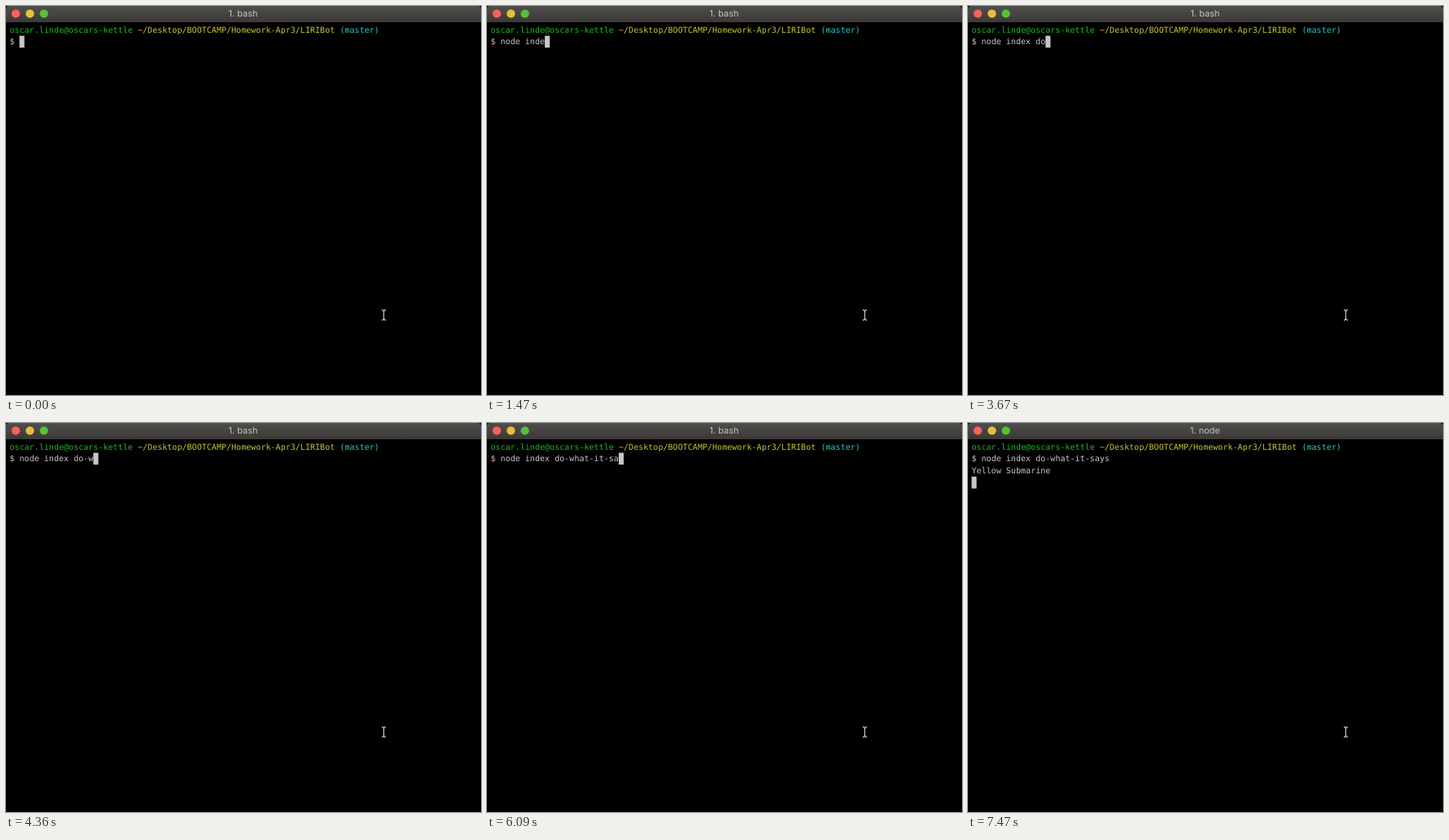
An HTML page that plays this animation: 584 by 479 pixels, repeating every 8000 ms.

```html
<!DOCTYPE html>
<html lang="en">
<head>
<meta charset="utf-8">
<title>Terminal</title>
<style>
  html, body { margin: 0; width: 100%; height: 100%; overflow: hidden; background: #000; }
  svg { display: block; width: 584px; height: 479px; }
  text { white-space: pre; text-rendering: geometricPrecision; }
  .term { font: 10.07px "DejaVu Sans Mono", monospace; fill: #c7c7c7; }
  .title { font: 11px Inter, sans-serif; fill: #c4c2c0; text-anchor: middle; }
</style>
</head>
<body>
<svg viewBox="0 0 584 479">
  <defs>
    <linearGradient id="bar" x2="0" y2="1">
      <stop offset="0" stop-color="#504e4c"/>
      <stop offset="1" stop-color="#3b3937"/>
    </linearGradient>
  </defs>
  <rect width="584" height="479"/>
  <path d="M0 20V4Q0 0 4 0H580Q584 0 584 4V20Z" fill="url(#bar)"/>
  <circle cx="12" cy="9.4" r="5.2" fill="#fb5f5a"/>
  <circle cx="29.4" cy="9.4" r="5.2" fill="#e5bf3c"/>
  <circle cx="46.6" cy="9.4" r="5.2" fill="#56c037"/>
  <text id="title" class="title" x="291.5" y="13.3"></text>
  <g id="lines" class="term"></g>
  <rect id="caret" width="6.1" height="14.6" fill="#c7c7c7"/>
  <path d="M462 374Q464.5 374.3 464.5 377V384Q464.5 386.7 462 387M467 374Q464.5 374.3 464.5 377M464.5 384Q464.5 386.7 467 387" fill="none" stroke="#cfcfcf" stroke-width="1.1"/>
</svg>
<script>
const LOOP = 8000, CELL = 6.06, LINE = 14.67, LEFT = 4.4;

// One slot per beat, split by "|": characters to type, "<" to delete, or a pause.
const BEATS = "n|o|d|e| ||in||d|e||x|||<|x| |||||d|||o|||-||w|h|at||-||i|t||-|s||a|ys".split("|");
const BEAT = 145, TYPE = 140, ENTER = 6790, OUTPUT = 7070, RETITLE = 7470;

const byId = id => document.getElementById(id);
const title = byId("title"), caret = byId("caret"), lines = byId("lines");

function addText(col, row, text, color) {
  const el = document.createElementNS("http://www.w3.org/2000/svg", "text");
  el.setAttribute("x", LEFT + col * CELL);
  el.setAttribute("y", 32.7 + row * LINE);
  if (color) el.setAttribute("fill", color);
  el.textContent = text;
  lines.append(el);
  return el;
}

addText(0, 0, "oscar.linde@oscars-kettle", "#1db825");
addText(26, 0, "~/Desktop/BOOTCAMP/Homework-Apr3/LIRIBot", "#c7c436");
addText(67, 0, "(master)", "#30c3c9");
addText(0, 1, "$");
const typed = addText(2, 1, "");
const output = addText(0, 2, "");

function commandAt(t) {
  const played = Math.max(0, Math.floor((t - TYPE) / BEAT) + 1);
  return BEATS.slice(0, played).reduce(
    (text, keys) => keys === "<" ? text.slice(0, -1) : text + keys, "");
}

function render(t) {
  const command = commandAt(t);
  const row = t >= OUTPUT ? 3 : t >= ENTER ? 2 : 1;
  const col = row > 1 ? 0 : 2 + command.length;

  typed.textContent = command;
  output.textContent = t >= OUTPUT ? "Yellow Submarine" : "";
  title.textContent = t >= RETITLE ? "1. node" : "1. bash";
  caret.setAttribute("x", LEFT + col * CELL);
  caret.setAttribute("y", 22 + row * LINE);
}

const start = performance.now();
function tick() {
  render((performance.now() - start) % LOOP);
  requestAnimationFrame(tick);
}
tick();
</script>
</body>
</html>
```
